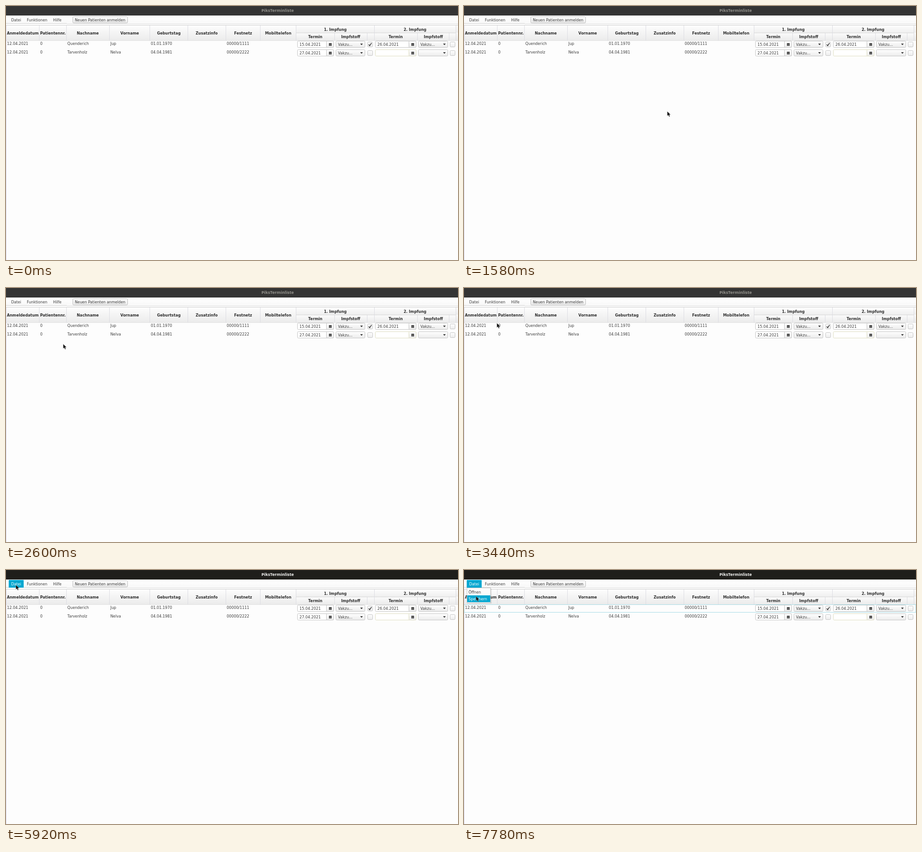
These frames come from a looping animation (998 px wide and 561 px high, 8 s). An HTML page with a canvas:

```html
<!DOCTYPE html>
<html lang="de">
<head>
<meta charset="utf-8">
<title>Terminliste</title>
<style>
html, body { margin: 0; width: 100%; height: 100%; overflow: hidden; background: #fdfdfd; }
canvas { display: block; width: 998px; height: 561px; }
</style>
</head>
<body>
<canvas id="stage" width="998" height="561"></canvas>
<script>
const ctx = document.getElementById('stage').getContext('2d');
const W = 998, H = 561, LOOP = 8000;
const ACCENT = '#05a7d0', BORDER = '#c3c3c3', INK = '#3c3c3c';
const FONT = '8.2px "DejaVu Sans", sans-serif';
const BOLD = 'bold ' + FONT;

// Pointer strokes: [time, x, y] points, held between strokes.
const strokes = [
  { steps: 17, points: [[500, 981, 347], [880, 690, 284], [1300, 504, 243]] },
  { steps: 17, points: [[1320, 499, 241], [1580, 441, 231.5], [2040, 294, 192]] },
  { steps: 18, points: [[2140, 272, 182], [2600, 118, 120.5], [2880, 94, 108]] },
  { steps: 18, points: [[2980, 91, 104], [3440, 71.5, 76], [3720, 56, 58]] },
  { steps: 11, points: [[3820, 53, 56], [4260, 34, 41]] },
  { steps: 8, points: [[4940, 34, 41], [4985, 32, 38], [5240, 22.5, 33.5]] },
  { steps: 1, points: [[5380, 21.8, 33]] },
  { steps: 15, points: [[7060, 22, 34], [7780, 26.5, 58]] }
];

function along(points, t) {
  for (let i = 1; i < points.length; i++) {
    const [t0, x0, y0] = points[i - 1], [t1, x1, y1] = points[i];
    if (t <= t1) {
      const k = (t - t0) / (t1 - t0);
      return { x: x0 + (x1 - x0) * k, y: y0 + (y1 - y0) * k };
    }
  }
  const [, x, y] = points[points.length - 1];
  return { x, y };
}

function pointerAt(t) {
  const stroke = strokes.filter(s => s.points[0][0] <= t).pop();
  if (!stroke) return null;
  const { points, steps } = stroke;
  const start = points[0][0], end = points[points.length - 1][0];
  if (t >= end) return along(points, end);
  const step = (end - start) / (steps - 1);
  return along(points, start + Math.floor((t - start) / step + 1e-6) * step);
}

function rect(x, y, w, h, fill) {
  ctx.fillStyle = fill;
  ctx.fillRect(x, y, w, h);
}

function shade(x, y, w, h, top, bottom) {
  const g = ctx.createLinearGradient(0, y, 0, y + h);
  g.addColorStop(0, top);
  g.addColorStop(1, bottom);
  rect(x, y, w, h, g);
}

function text(str, x, y, { font = FONT, color = INK, align = 'left' } = {}) {
  ctx.font = font;
  ctx.fillStyle = color;
  ctx.textAlign = align;
  ctx.fillText(str, x, y + 3);
}

function heading(str, x, y) {
  text(str, x, y, { font: BOLD, color: '#2e2e2e', align: 'center' });
}

function box(x, y, w, h, { top = '#ffffff', bottom = '#ebebeb', border = BORDER } = {}) {
  const g = ctx.createLinearGradient(0, y, 0, y + h);
  g.addColorStop(0, top);
  g.addColorStop(1, bottom);
  ctx.beginPath();
  ctx.roundRect(x + .5, y + .5, w - 1, h - 1, 2);
  ctx.fillStyle = g;
  ctx.fill();
  ctx.strokeStyle = border;
  ctx.lineWidth = 1;
  ctx.stroke();
}

function polygon(points, fill) {
  ctx.beginPath();
  points.forEach(([x, y]) => ctx.lineTo(x, y));
  ctx.closePath();
  ctx.fillStyle = fill;
  ctx.fill();
}

function titleBar(active) {
  rect(0, 0, W, 21, active ? '#1f1e1b' : '#343434');
  text('PiksTerminliste', 599.7, 10, {
    font: 'bold 9.3px "Open Sans", sans-serif',
    color: active ? '#ffffff' : '#96958f',
    align: 'center'
  });
}

function menuBar(selected) {
  shade(0, 21, W, 18, '#ffffff', '#f8f8f8');
  rect(0, 38, 134, 1, '#cfcfcf');
  rect(134, 39, W - 134, 1, '#dedede');
  if (selected) rect(6, 22, 33, 17, ACCENT);
  text('Datei', 11.5, 31, { color: selected ? '#ffffff' : INK });
  text('Funktionen', 46, 31);
  text('Hilfe', 104, 31);
  box(147, 23, 122, 15, { bottom: '#e9e9e9', border: '#bcbcbc' });
  text('Neuen Patienten anmelden', 152, 31);
}

function tableHeader() {
  rect(0, 42, W, 1, '#cdcdcd');
  shade(0, 43, W, 33, '#fdfdfd', '#ebebeb');
  shade(641, 43, W - 641, 16, '#fdfdfd', '#efefef');
  shade(641, 59, W - 641, 17, '#fbfbfb', '#ebebeb');
  rect(641, 59, 352, 1, '#d6d6d6');
  for (const x of [73, 133, 228, 317, 401, 485, 561, 640, 813, 993]) rect(x, 43, 1, 33, '#dcdce2');
  for (const x of [725, 797, 908, 978]) rect(x, 60, 1, 16, '#dcdce2');
  rect(0, 76, W, 1, '#e2e2e2');

  const columns = [['Anmeldedatum', 37], ['Patientennr.', 103.5], ['Nachname', 180.5], ['Vorname', 273],
    ['Geburtstag', 359.5], ['Zusatzinfo', 443], ['Festnetz', 523.5], ['Mobiltelefon', 601]];
  columns.forEach(([name, x]) => heading(name, x, 59.5));
  heading('1. Impfung', 727, 51.5);
  heading('2. Impfung', 903, 51.5);
  [683, 860.5].forEach(x => heading('Termin', x, 68));
  [761, 943.5].forEach(x => heading('Impfstoff', x, 68));
}

function datePicker(x, y, w, value, border) {
  box(x, y, w, 15, { bottom: '#ffffff', border });
  box(x + w - 17, y, 17, 15, { border });
  const ix = x + w - 11, iy = y + 5;
  rect(ix, iy, 6, 6, '#454545');
  for (let i = 0; i < 2; i++) rect(ix + 1, iy + 2 + i * 2, 4, .6, '#a5a5a5');
  text(value, x + 5, y + 8);
}

function comboBox(x, y, w, value) {
  box(x, y, w, 15);
  text(value, x + 5, y + 8);
  const ax = x + w - 8, ay = y + 6;
  polygon([[ax - 3, ay], [ax + 3, ay], [ax, ay + 3.5]], '#3a3a3a');
}

function checkBox(x, y, checked) {
  box(x, y, 12, 12);
  if (!checked) return;
  ctx.beginPath();
  ctx.moveTo(x + 2.8, y + 6);
  ctx.lineTo(x + 5, y + 8.7);
  ctx.lineTo(x + 9.2, y + 2.6);
  ctx.strokeStyle = '#2c2c2c';
  ctx.lineWidth = 1.5;
  ctx.stroke();
}

const patients = [
  { cells: ['12.04.2021', '0', 'Quenderich', 'Jup', '01.01.1970', '00000/1111'],
    first: '15.04.2021', second: '26.04.2021', vaccines: ['Vakzu...', 'Vakzu...'], done: true },
  { cells: ['12.04.2021', '0', 'Tarvenholz', 'Nelva', '04.04.1981', '00000/2222'],
    first: '27.04.2021', second: '', vaccines: ['Vakzu...', ''], done: false }
];
const cellX = [2.2, 75.5, 135.5, 230.5, 319.8, 487.3];

function patientRow(p, index) {
  const y = 77 + index * 18.7, top = Math.round(y);
  p.cells.forEach((cell, i) => text(cell, cellX[i], Math.round(y + 6)));
  datePicker(643, top, 81, p.first);
  comboBox(728, top, 65, p.vaccines[0]);
  checkBox(798, top + 2, p.done);
  datePicker(815, top, 91, p.second, p.second ? BORDER : '#deddc0');
  comboBox(910, top, 66, p.vaccines[1]);
  checkBox(980, top + 2, false);
}

function rowFocus() {
  ctx.strokeStyle = '#a6dbe6';
  ctx.lineWidth = 1;
  ctx.strokeRect(.5, 76.5, W - 1, 17);
}

function popup(pointerY) {
  rect(7, 41, 54, 33, 'rgba(0,0,0,.10)');
  rect(6, 39, 53, 34, '#c6c6c6');
  rect(7, 40, 51, 32, '#fbfbfb');
  const active = pointerY >= 56 ? 1 : pointerY >= 41 ? 0 : -1;
  ['Öffnen', 'Speichern'].forEach((label, i) => {
    const on = i === active;
    if (on) rect(7, 41 + i * 15, 51, 15, ACCENT);
    text(label, 10, 49 + i * 15, { color: on ? '#ffffff' : INK });
  });
}

function arrow(x, y) {
  const shape = [[0, 0], [0, 10], [2.3, 8], [4, 11.8], [5.8, 11], [4.2, 7.4], [7.3, 7.2]];
  polygon(shape.map(([dx, dy]) => [x + dx, y + dy]), '#111111');
  ctx.strokeStyle = 'rgba(255,255,255,.55)';
  ctx.lineWidth = .6;
  ctx.stroke();
}

function resizer(x, y) {
  rect(x - .8, y - 4, 1.6, 8, '#111111');
  for (const dir of [-1, 1]) {
    polygon([[x - 2.8, y + 2.3 * dir], [x + 2.8, y + 2.3 * dir], [x, y + 5.5 * dir]], '#111111');
  }
}

function draw(t) {
  const pointer = pointerAt(t);
  const menuOpen = t >= 5960;
  const selected = menuOpen || (t >= 4940 && pointer.y < 39);
  rect(0, 0, W, H, '#fdfdfd');
  titleBar(t >= 5920);
  menuBar(selected);
  tableHeader();
  patients.forEach(patientRow);
  rect(0, 43, 1, H - 43, '#d9d7ec');
  if (menuOpen) {
    rowFocus();
    popup(pointer.y);
  }
  if (!pointer) return;
  const onDivider = !menuOpen && pointer.y >= 39 && pointer.y <= 42;
  (onDivider ? resizer : arrow)(pointer.x, pointer.y);
}

let start;
function tick(now) {
  start ??= now;
  draw((now - start) % LOOP);
  requestAnimationFrame(tick);
}
draw(0);
requestAnimationFrame(tick);
</script>
</body>
</html>
```
